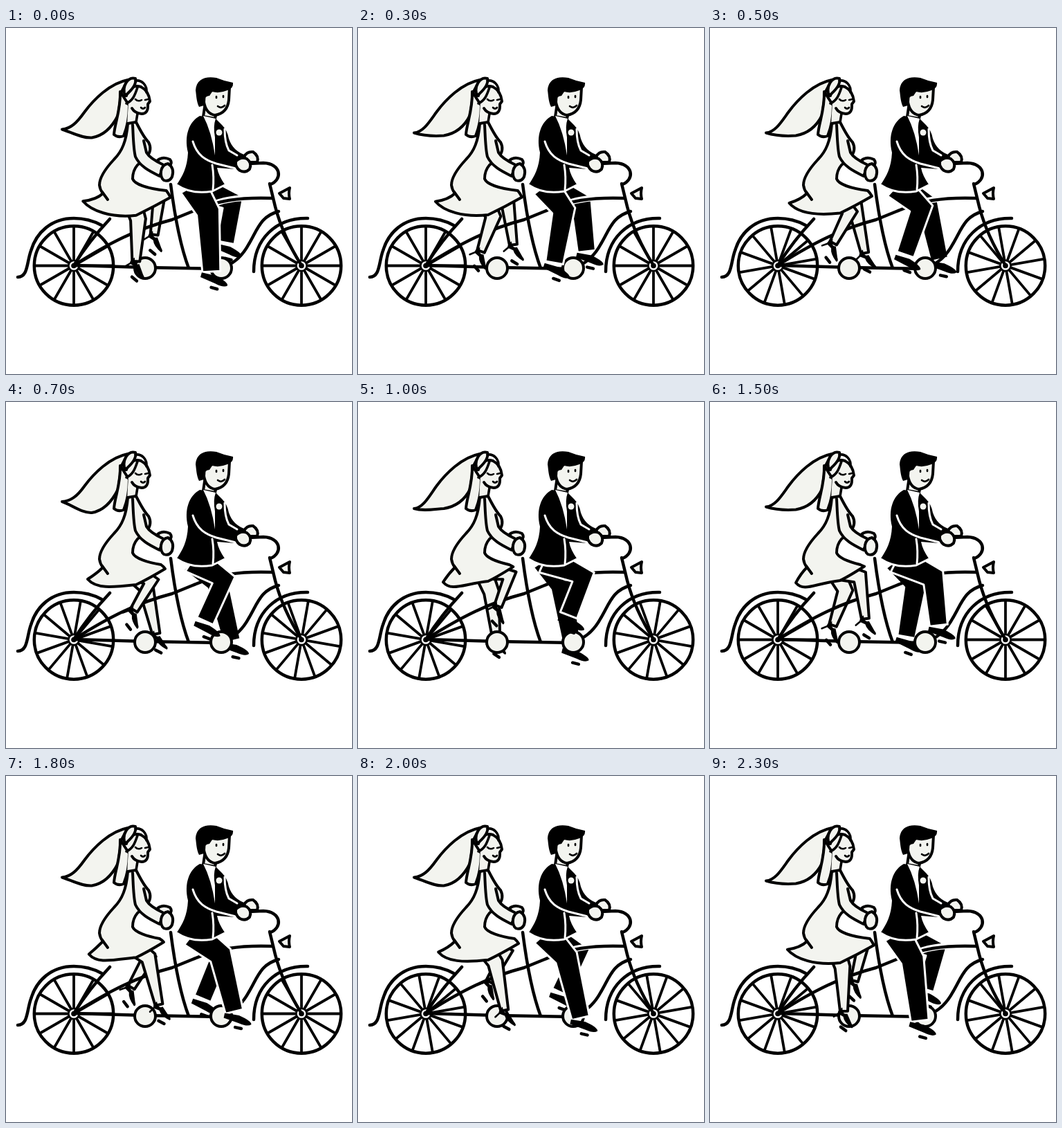
An HTML page for the animation above (2.4 s loop, 500 by 500 pixels).

```html
<!DOCTYPE html>
<html lang="en">
<head>
<meta charset="utf-8">
<title>Tandem ride</title>
<style>
  html, body { margin: 0; width: 100%; height: 100%; overflow: hidden; background: #fff; }
  svg { display: block; width: 100vw; height: 100vh; }
  .line { fill: none; stroke: #000; stroke-width: 4.5; }
  .skin { fill: #f3f4ef; stroke: #000; stroke-width: 4; }
  .thin { fill: none; stroke: #000; stroke-width: 2.6; }
  .gap { fill: none; stroke: #fff; stroke-width: 3; }
  .trouser { stroke: #fff; stroke-width: 3; }
</style>
</head>
<body>
<svg viewBox="0 0 500 500" stroke-linecap="round" stroke-linejoin="round">
  <defs>
    <g id="spokes"></g>
    <g id="hub"><circle r="9"/><circle r="6.3" fill="#fff"/><circle r="3.8"/></g>
    <g id="pump">
      <path d="M-5-3Q-8 4-5 8L4 7Q10 13 24 13Q26 10 20 8L6 0Q2 6-5-3Z"/>
      <path class="thin" d="M-4 6L-7 15"/>
      <path class="line" d="M10 21H19"/>
    </g>
    <g id="brogue">
      <path d="M-13 5L8 4Q27 8 28 13Q24 18 10 15L-13 12Z"/>
      <path class="line" d="M6 22H15"/>
    </g>
  </defs>

  <g id="wheels"></g>

  <path class="line" d="M17 360C32 360 30 338 36 322C44 295 66 275 98 275Q120 275 138 285M98 343Q120 308 150 276"/>
  <path class="line" d="M358 352C358 305 390 274 436 275"/>

  <g id="farLegs"></g>

  <path class="line" d="M98 343C150 310 190 290 240 277L272 264M98 343L201 346L311 348M238 226C243 265 250 310 264 347"/>
  <path class="gap" style="stroke-width:9" d="M300 254C320 247 340 244 372 246"/>
  <path class="line" d="M272 264C305 250 335 244 386 246"/>
  <path class="line" d="M394 265C368 272 364 290 351 312Q338 336 318 344"/>
  <path class="line" d="M381 225L389 258Q400 300 427 343"/>
  <path class="line" d="M350 196L372 195C398 196 400 219 382 226"/>
  <path class="skin" d="M395 239L410 231Q408 239 410 247L401 246Z"/>
  <circle class="skin" cx="201" cy="347" r="15"/>
  <circle class="skin" cx="311" cy="347" r="15"/>

  <g id="nearLegs"></g>

  <!-- bride -->
  <path id="veil" class="skin"/>
  <path class="skin" d="M165 92C166 118 157 138 156 154Q162 159 170 156C174 146 178 132 178 112Z"/>
  <path class="skin" style="stroke:none" d="M177 106L175 140L189 140L190 122Z"/>
  <path class="skin" d="M174 98C176 86 186 82 195 85C203 89 207 97 208 106L205 110Q206 124 196 124Q186 123 182 116"/>
  <path class="skin" d="M172 98C167 84 176 70 187 73C189 80 184 88 172 98Z"/>
  <path class="line" style="stroke-width:3.6" d="M187 76C197 75 204 83 203 93M190 86C186 98 183 105 174 109M190 124L188 136"/>
  <path class="thin" d="M187 103Q191 107 196 104M201 104L205 103M195 115Q198 118 201 115"/>
  <path class="skin" d="M219 191Q227 185 237 190Q241 195 236 200L224 200Z"/>
  <path id="dress" class="skin"/>
  <path class="line" style="stroke-width:4" d="M139 237L147 248"/>
  <path class="skin" d="M183 140C184 158 184 174 187 186C194 201 210 208 222 214L228 198C215 192 207 187 203 180L199 163"/>
  <path class="skin" d="M224 207Q226 197 234 196Q244 202 240 215Q236 223 228 220Q223 216 224 207Z"/>

  <!-- groom -->
  <path class="skin" d="M288 108L285 128L302 131L304 122Z"/>
  <path class="skin" d="M287 92L286 107Q289 124 302 126Q320 123 322 104L323 86Z"/>
  <path d="M279 114C275 106 275 96 274 90C275 74 288 69 304 72Q316 77 328 79Q329 87 320 90Q308 95 298 92L294 98Q285 98 286 112Z"/>
  <path class="thin" d="M304 99V101M314 98V100M306 113Q311 117 316 112"/>
  <path d="M280 127C265 135 257 155 263 180C262 202 255 214 247 226C262 236 280 238 298 235L316 226Q307 213 305 202L331 204L336 192L346 187L347 184C334 180 326 172 322 160Q320 148 312 140L302 130Z"/>
  <path class="gap" d="M247 227C262 237 280 239 298 236L316 227M270 164C276 184 288 191 304 196L332 203M298 198Q301 215 299 234M316 146Q316 166 322 177L334 184"/>
  <path fill="#fff" d="M285 127L303 131Q299 142 302 158L302 184Q297 150 285 127Z"/>
  <circle cx="308" cy="151" r="4.5" fill="#f3f4ef"/>
  <path class="skin" d="M344 186Q348 178 357 179Q366 185 363 194L351 194Z"/>
  <path class="skin" d="M332 193Q339 185 348 189Q356 195 352 204Q346 210 338 206Q331 201 332 193Z"/>
</svg>

<script>
const $ = id => document.getElementById(id);
const STEPS = 24, STEP_MS = 100, TAU = 2 * Math.PI;

// Knee and ankle travel around ellipses; lag is the ankle's lead on the knee.
const bride = {
  hip: [180, 243], radii: [13, 11, 5.5], cls: "skin", shoe: "pump",
  knee: { x: 206, y: 263, rx: 15, ry: 14 },
  ankle: { x: 201, y: 318, rx: 24, ry: 23, lead: 0.58 },
  foot: { angle: 40, swing: 13 }
};
const groom = {
  hip: [270, 228], radii: [20, 17, 13], cls: "trouser", shoe: "brogue",
  knee: { x: 310, y: 259, rx: 18, ry: 7 },
  ankle: { x: 307, y: 331, rx: 25, ry: 23, lead: 0.42 },
  foot: { angle: 16, swing: 4 }
};

// Tapered limb through three joints
function limb(joints, radii) {
  const unit = (p, q) => {
    const x = q[0] - p[0], y = q[1] - p[1], d = Math.hypot(x, y);
    return [x / d, y / d];
  };
  const upper = unit(joints[0], joints[1]), lower = unit(joints[1], joints[2]);
  const mid = unit([0, 0], [upper[0] + lower[0], upper[1] + lower[1]]);
  const side = sign => [upper, mid, lower].map((d, j) => {
    const r = sign * radii[j];
    return [joints[j][0] - d[1] * r, joints[j][1] + d[0] * r].map(v => v.toFixed(1));
  });
  return "M" + [...side(1), ...side(-1).reverse()].join("L") + "Z";
}

function leg({ hip, radii, cls, shoe, knee, ankle, foot }, phase) {
  const crank = phase + ankle.lead;
  const kneeAt = [knee.x - knee.rx * Math.cos(phase), knee.y + knee.ry * Math.cos(phase)];
  const ankleAt = [ankle.x - ankle.rx * Math.sin(crank), ankle.y + ankle.ry * Math.cos(crank)];
  const turn = foot.angle + foot.swing * Math.sin(phase);
  return `<path class="${cls}" d="${limb([hip, kneeAt, ankleAt], radii)}"/>
    <use href="#${shoe}" transform="translate(${ankleAt}) rotate(${turn})"/>`;
}

function dressPath(c) {
  const x = 118 - 7 * c, y = 256 - 6 * c;
  return `M176 138C174 163 168 178 156 190C143 204 135 216 135 227Q136 234 140 239Q131 248 ${x} ${y}
    C${x + 12} ${y + 14} 152 ${268 + 7 * c} 188 ${264 + 7 * c}
    Q${205 + 8 * c} ${256 + 3 * c} ${230 + 8 * c} ${241 + 4 * c}
    Q${228 + 7 * c} ${238 + c} ${224 + 8 * c} 235
    C205 232 186 226 183 218Q183 206 190 198L203 187Q212 176 206 165Q199 158 188 136Z`;
}

function veilPath(wave) {
  const tip = 149 - 5 * wave, fold = 157 + 3 * wave;
  return `M176 75C150 80 127 103 113 122C103 136 94 ${tip - 1} 81 ${tip}
    C94 ${tip + 4} 110 ${fold + 1} 124 ${fold}C142 ${fold - 3} 154 142 162 126L167 92Z`;
}

function draw(step) {
  const phase = step * TAU / STEPS;
  $("spokes").setAttribute("transform", `rotate(${10 * step})`);
  $("farLegs").innerHTML = leg(bride, phase + Math.PI) + leg(groom, phase + Math.PI);
  $("nearLegs").innerHTML = leg(bride, phase) + leg(groom, phase);
  $("dress").setAttribute("d", dressPath(Math.cos(phase - 0.26)));
  $("veil").setAttribute("d", veilPath(Math.cos(4 * phase - TAU / 6)));
}

$("spokes").innerHTML = Array.from({ length: 6 }, (_, j) =>
  `<path class="line" style="stroke-width:3.8" d="M-56 0H56" transform="rotate(${30 * j})"/>`).join("");
$("wheels").innerHTML = [98, 427].map(x => `<g transform="translate(${x} 343.5)">
  <circle class="line" r="57.2"/><use href="#spokes"/><use href="#hub"/></g>`).join("");

const start = performance.now();
function tick() {
  draw(Math.floor((performance.now() - start) / STEP_MS) % STEPS);
  requestAnimationFrame(tick);
}
tick();
</script>
</body>
</html>
```
